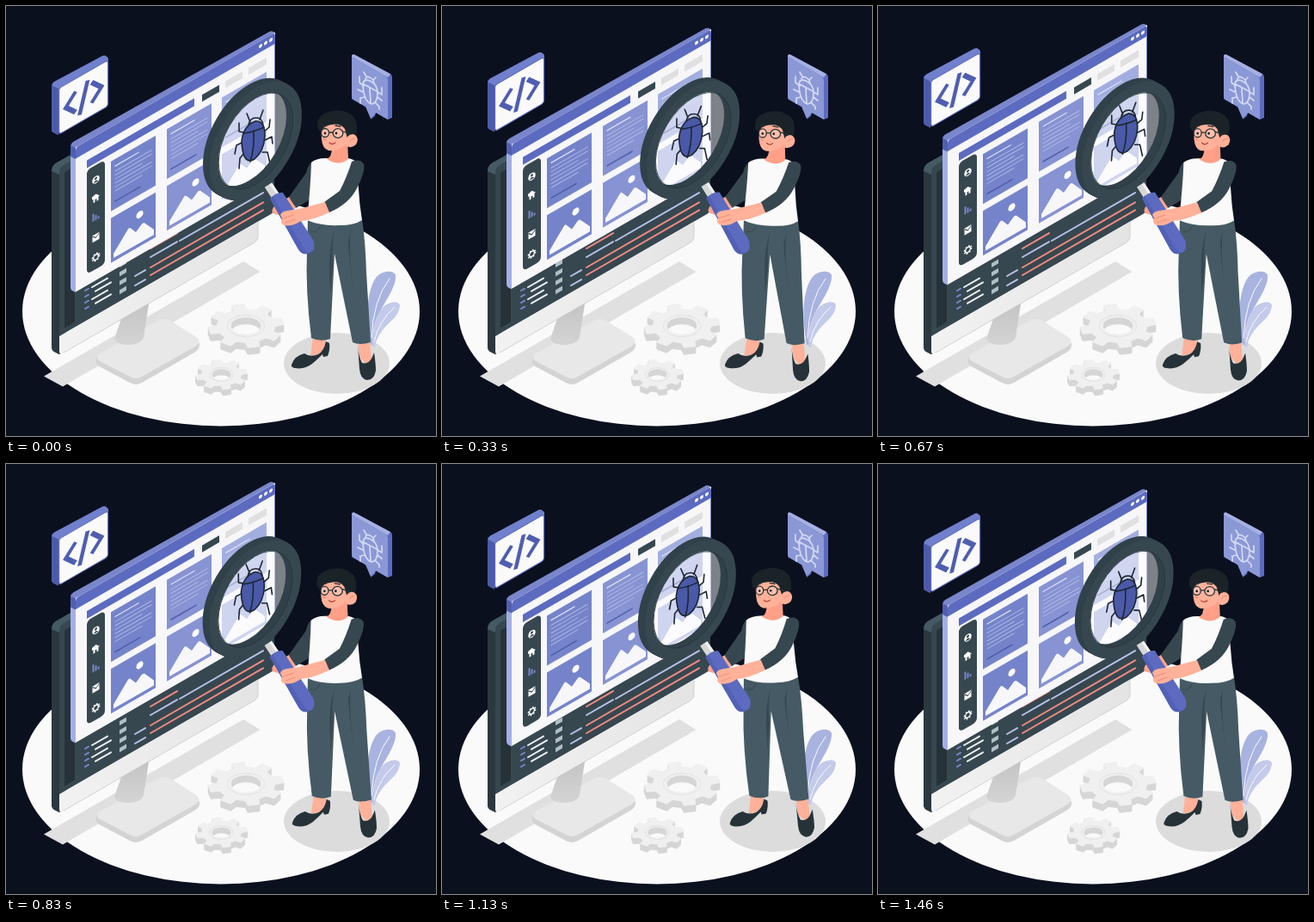
An HTML page that plays this animation: 500 by 500 pixels, repeating every 1.5 s.

```html
<!DOCTYPE html>
<html lang="en">
<head>
<meta charset="utf-8">
<title>Bug search</title>
<style>
  html, body { margin: 0; width: 100%; height: 100%; overflow: hidden; background: #0a101e; }
  svg { display: block; width: 100vw; height: 100vh; }
  .ln { fill: none; stroke-linecap: round; stroke-linejoin: round; }
</style>
</head>
<body>
<svg viewBox="0 0 500 500">
  <defs>
    <linearGradient id="neck" x2="0" y2="1"><stop stop-color="#c2c2c2"/><stop offset="1" stop-color="#d4d4d4"/></linearGradient>
    <linearGradient id="chin" x2="1"><stop stop-color="#f2f2f2"/><stop offset="1" stop-color="#e4e4e4"/></linearGradient>
  </defs>

  <!-- floor -->
  <ellipse cx="250" cy="355" rx="231" ry="133.4" fill="#fafafa"/>
  <path d="M44 430.500 276 297 295.500 309 66 442.500Z" fill="#e0e0e0"/>
  <ellipse cx="384.500" cy="415.500" rx="61.500" ry="35.500" fill="#dcdcdc"/>
  <g id="gears"></g>

  <!-- leaves -->
  <path d="M424 394C419 366 418 334 430 316 437 307 451 307 453 313 454 328 439 345 431 363 427 374 426 384 427 394Z" fill="#a9b3e0"/>
  <path d="M426 396C427 374 431 355 441 348 449 343 457 343 458 348 457 362 445 367 437 378 432 385 430 390 429 397Z" fill="#c3caea"/>
  <g class="ln" stroke="#fafafa"><path d="M425 386Q427 341 446 317M428 390Q434 365 452 350"/></g>

  <!-- stand -->
  <path d="M105 408V415Q106 418 110 420L144 438Q151 442 158 438L219 403Q226 399 225 392Z" fill="#d4d4d4"/>
  <path d="M109 404 176 366Q184 362 191 366L220 384Q229 390 220 396L158 431Q151 435 144 431L109 413Q102 408 109 404Z" fill="#e8e8e8"/>
  <path d="M136 358 167 340 160 385Q158 393 143 394 128 394 126 387Z" fill="url(#neck)"/>

  <!-- monitor -->
  <path d="M53 192Q53 185 59 182L75 173 85 180 68 402 62 405 56 402Q53 400 53 396Z" fill="#455a64"/>
  <path d="M53 192 62 196V405L56 402Q53 400 53 396Z" fill="#2b383f"/>
  <g transform="matrix(1 -.577 0 1 62 188)">
    <path d="M0 6Q0 0 5 0H250V190Q250 196 246 196H0Z" fill="#37474f"/>
    <path d="M6 9H232V190H6Z" fill="#263238"/>
    <path d="M18 20H250V190Q250 194 246 194H18Z" fill="#37474f"/>
    <path d="M0 196H231V213Q231 218 226 218H5Q0 218 0 213Z" fill="url(#chin)"/>
    <path d="M231 196V213Q231 218 226 218H5" fill="none" stroke="#c8c8c8" stroke-width=".7"/>
  </g>
  <g id="code" class="ln" stroke-width="2"></g>

  <!-- floating window -->
  <g class="float">
    <path d="M75 163Q75 160 78 158L306 30Q309 28 313 31L313 34 81 168Z" fill="#7986cb"/>
    <path d="M75 162 81 165V333L77 331Q75 330 75 327Z" fill="#a3aee6"/>
    <path d="M75 162 81 165V178L75 175Z" fill="#5060b0"/>
    <g transform="matrix(1 -.577 0 1 81 164.500)">
      <path d="M0 0H232V165Q232 168 229 168H0Z" fill="#f7f7fa"/>
      <path d="M0 4Q0 0 4 0H228Q232 0 232 4V13H0Z" fill="#5c6bc0"/>
      <path d="M231.500 13V164" stroke="#7986cb"/>
      <g fill="#fff"><circle cx="215" cy="6" r="2"/><circle cx="221" cy="6" r="2"/><circle cx="227" cy="6" r="2"/></g>
      <path d="M13 22.500H138V31.500H13Z" fill="#5c6bc0"/>
      <path d="M147 23.500H167V31.500H147Z" fill="#37474f"/>
      <path d="M174 23.500H194V31.500H174ZM201 23.500H222V31.500H201Z" fill="#e0e0e0"/>
      <rect x="13" y="34" width="21" height="121" rx="5" fill="#37474f"/>
      <g transform="translate(23.500 0)" fill="#fff">
        <circle cy="51" r="4.200"/>
        <path d="M-4.500 69 0 67.500 4.500 72H3V76.500H1V73.500H-1V76.500H-3V72H-4.500Z"/>
        <path d="M-4 89H-2V98H-4ZM-1 92H1V98H-1ZM2 95H4V98H2Z" fill="#7986cb"/>
        <path d="M-4 114H4V122H-4Z"/>
        <circle cy="141" r="3" fill="none" stroke="#fff" stroke-width="1.500"/>
        <circle cy="141" r="4.200" fill="none" stroke="#fff" stroke-width="1.400" stroke-dasharray="1.65"/>
        <g fill="#37474f"><circle cy="49.500" r="1.500"/><path d="M-2.700 54Q0 49.500 2.700 54Z"/></g>
        <path d="M-4 115 0 118.500 4 115" fill="none" stroke="#37474f"/>
      </g>
      <g id="cards"></g>
    </g>
  </g>

  <!-- code tag -->
  <g class="float">
    <path d="M53 93Q53 90 56 88L112 58Q116 56 119 61V65L61 98V150L55 147Q53 146 53 143Z" fill="#7180cd"/>
    <path d="M53 92 61 96V150L55 147Q53 146 53 143Z" fill="#4c5ba9"/>
    <g transform="matrix(1 -.577 0 1 61 95.500)">
      <rect x=".6" y=".6" width="57" height="53.500" rx="3" fill="#fafafa" stroke="#5c6bc0" stroke-width="1.200"/>
      <path class="ln" style="stroke-linecap:butt;stroke-linejoin:miter" d="M20 15.500 8.500 27.500 20 39.500M34 10.500 24.500 45.500M38.500 15.500 50 27.500 38.500 39.500" stroke="#4f5eb0" stroke-width="5"/>
    </g>
  </g>

  <!-- bug tag -->
  <path d="M402 59Q402 55 406 57L447 79Q449 80 449 83V130L444 132 402 108Z" fill="#5c6bc0"/>
  <path d="M402 59Q402 55 406 57L447 79 444 83Z" fill="#a7b0e2"/>
  <path d="M431 121 429 128 424 132 427 121Z" fill="#5c6bc0"/>
  <path d="M402 59 441 81Q444 83 444 86V132L430 124 424 131 418 117 404 109Q402 108 402 105Z" fill="#8b98d6"/>
  <g class="ln" stroke="#d5daf2" stroke-width="1.700">
    <path d="M415 92Q415 84 423 87 432 91 432 101 432 113 425 114 416 111 415 92ZM416 91 431 99M423 96 424 113M418 86Q418 81 423 83 428 85 428 91M419 82 416 77M427 86 430 83M416 93 411 89V82M415 100 409 97M417 106 412 107V113M432 100 437 103V95M432 106 437 110M429 112 434 117V120"/>
  </g>

  <!-- figure with magnifier -->
  <g id="figure">
    <path d="M358 179Q351 184 349 194L329 222 337 235 352 226 361 205Z" fill="#37474f"/>
    <path d="M329 222 337 235 324 245 310 241Q308 236 313 232Z" fill="#ffa58d"/>

    <!-- legs -->
    <path d="M357 384H371L372 395 366 404 354 407Z" fill="#ffb199"/>
    <path d="M409 389H423L425 412 419 417 411 408Z" fill="#ffb199"/>
    <path d="M332 417Q335 407 347 404 354 409 363 405 370 401 372 390L376 392Q377 400 374 407L369 408 368 405Q362 411 356 416 347 423 336 421 331 420 332 417Z" fill="#263238"/>
    <path d="M409 395Q410 408 414 415 421 417 425 410L428 403Q430 416 430 424 428 435 420 435 412 434 411 422Z" fill="#263238"/>
    <path d="M351 248H414Q418 274 419 310L424 391Q411 395 403 391L382 288 377 387Q366 391 355 386 348 330 350 284Z" fill="#455a64"/>
    <path d="M382 262Q378 279 380 300L377 335 376 300Q377 274 382 262ZM402 259Q397 276 404 330 398 287 398 273Z" fill="#37474f"/>
    <path class="ln" d="M355 262Q362 264 365 256" stroke="#37474f"/>

    <!-- torso -->
    <path d="M371 177Q361 177 355 182 354 213 350 249 366 256 388 255 405 255 414 249 411 231 410 213L407 181Q402 177 396 177Z" fill="#fafafa"/>
    <path d="M379 164 397 155 398 178Q387 187 373 178 379 176 379 164Z" fill="#ff9f87"/>

    <!-- magnifier -->
    <g id="lens"></g>
    <path d="M305 208 314 222" stroke="#d7d7d7" stroke-width="10"/>
    <path d="M308 207 317 220" stroke="#f3f3f3" stroke-width="3"/>
    <path d="M307 224Q314 216 322 217L357 272Q361 284 353 287 345 291 340 283Z" fill="#5c6bc0"/>
    <path d="M307 224 310 221 345 280Q348 286 353 287 345 291 340 283Z" fill="#5261b5"/>

    <!-- near arm -->
    <path d="M402 181Q412 177 416 184 418 192 408 212 399 230 376 240 371 236 370 228L388 215Q396 200 402 181Z" fill="#37474f"/>
    <path d="M371 228 376 240Q357 249 343 250 333 257 323 255 318 252 321 247L319 243Q320 239 327 238L341 236Z" fill="#ffb199"/>
    <path class="ln" d="M322 247 334 243M325 252 336 248" stroke="#ef8e78"/>

    <!-- head -->
    <path d="M369 134Q366 146 367 155 368 166 375 168 384 169 392 164L400 155 405 145 394 130Z" fill="#ffb199"/>
    <path d="M362 140Q361 127 376 123 390 119 401 126 409 131 408 145L404 157 397 154 394 143Q389 136 378 138 369 139 367 146 363 145 362 140Z" fill="#1a2328"/>
    <path d="M396 154Q400 147 406 150 411 154 407 161 402 166 396 163Z" fill="#ffb199"/>
    <path class="ln" d="M400 157Q403 153 406 154M372 151 369 155 372 156" stroke="#ef8e78"/>
    <g class="ln" stroke="#263238" stroke-width="1.300">
      <ellipse cx="371" cy="147.500" rx="4.500" ry="5" fill="#fff" fill-opacity=".2"/>
      <ellipse cx="386" cy="148" rx="5.800" ry="5.300" fill="#fff" fill-opacity=".2"/>
      <path d="M376 147H380M392 146 401 149M369 140 373 139M383 139 389 140"/>
    </g>
    <g fill="#1b242a"><circle cx="371" cy="148" r="1.400"/><circle cx="384" cy="148" r="1.400"/></g>
    <path class="ln" d="M376 159Q379 162 383 159" stroke="#b6473e" stroke-width="1.300"/>
  </g>
</svg>

<script>
const LOOP = 1500, STEPS = 36;
const $ = id => document.getElementById(id);
const fill = (id, html) => { $(id).innerHTML = html; };
const times = (n, f) => Array.from({ length: n }, (_, i) => f(i)).join('');
const line = (d, color, w) => `<path class="ln" d="${d}" stroke="${color}" stroke-width="${w}"/>`;

// line along the screen's slope, starting at x, y
const slant = (x, y, w, color) => line(`M${x} ${y}l${w} ${-.577 * w}`, color, 2);

const textCard = (x, color) => `<g transform="translate(${x} 40)">
  <path d="M0 0H52V58H0Z" fill="${color}"/>
  ${line('M5 8H32', '#dfe3f5', 1.4)}
  ${times(6, i => line(`M5 ${14 + 4.6 * i}H${i % 3 === 2 ? 36 : 47}`, '#b7c0e8', .9))}
  ${line('M5 49H34', '#4c5ba9', 1.6)}</g>`;

const imageCard = (x, color) => `<g transform="translate(${x} 106)">
  <path d="M0 0H52V52H0Z" fill="${color}"/>
  <circle cx="33.500" cy="15" r="4" fill="#fff"/>
  <path d="M3 48V43L19 25Q21 22 23 25L29 33 35 28Q37 26 39 28L50 42V48Z" fill="#f7f7fa"/></g>`;

fill('cards', [[41, '#7584ca'], [106, '#8793d2'], [170, '#a3aee0']]
  .map(([x, c]) => textCard(x, c) + imageCard(x, c)).join(''));

const lilac = '#b9c1ea', red = '#f28b82';
fill('code',
  times(4, i => slant(92, 331 + 7 * i, 4, '#7986cb') + slant(100 + i % 2 * 4, 327 + 7 * i - i % 2 * 2.3, 18, '#eceff1')) +
  times(4, i => `<path d="M132 ${299 + 10.4 * i}l8-4.600v5l-8 4.600z" fill="#b0bec5"/>`) +
  slant(150, 314, 12, lilac) + slant(150, 325, 12, lilac) +
  slant(168, 282, 31, red) + slant(168, 292, 31, lilac) + slant(202, 273, 97, lilac) +
  slant(168, 304, 131, red) + slant(168, 313, 131, red));

function gear(cx, cy, r, hole, depth) {
  const pts = [], pitch = Math.PI / 4;
  for (let k = 0; k < 8; k++) {
    for (const [a, q] of [[-.3, .77], [-.2, 1], [.2, 1], [.3, .77]]) {
      const t = (k + .73 + a) * pitch;
      pts.push([cx + r * q * Math.cos(t), cy + .577 * r * q * Math.sin(t)].map(v => v.toFixed(1)));
    }
  }
  const h = hole * .577;
  const d = `M${pts.join('L')}ZM${cx - hole} ${cy}a${hole} ${h} 0 1 0 ${2 * hole} 0a${hole} ${h} 0 1 0 ${-2 * hole} 0Z`;
  const layer = (y, color) => `<path transform="translate(0 ${y})" fill-rule="evenodd" stroke-linejoin="round" d="${d}" fill="${color}" stroke="${color}"/>`;
  return times(depth, i => layer(depth - i, '#d6d6d6')) + layer(0, '#f0f0f0') +
    `<ellipse cx="${cx}" cy="${cy}" rx="${hole * 1.2}" ry="${h * 1.2}" fill="none" stroke="#e2e2e2"/>`;
}
fill('gears', gear(279, 372, 44, 18, 8) + gear(250.5, 428.5, 30, 11.5, 7));

// upright discs facing left, swept back for the rim
const disc = (r, dx, color, more = '') =>
  `<circle r="${r}" transform="matrix(.866 -.5 0 1 ${290.5 + dx} ${157 + dx / 2})" fill="${color}" ${more}/>`;
const ring = (dx, color) => disc(56, dx, 'none', `stroke="${color}" stroke-width="11.500"`);

fill('lens', `
  ${disc(52, -6, '#fff', 'opacity=".47"')}
  <g id="bug" class="ln" stroke="#1c2733" stroke-width="1.600">
    <path d="M277 147 271 146 271 136M274 159 268 162 266 172M277 171 272 177 271 189M300 146 306 141 307 132M301 156 309 152 310 160M298 170 304 170 307 183M284 135 280 125M295 132 299 121M282 139Q283 130 291 130 298 130 299 139"/>
    <path d="M274 157Q276 139 290 134 301 133 301 151 300 169 289 178 275 186 274 157Z" fill="#4a59a8"/>
    <path d="M276 148Q287 147 300 141M288 145Q289 166 284 181"/>
  </g>
  ${times(8, i => ring(i - 8, '#31414a'))}
  ${ring(0, '#37474f')}
  ${disc(50, 0, 'none', 'stroke="#27343b" stroke-width=".8"')}`);

const floats = document.querySelectorAll('.float');

function draw(now) {
  const step = Math.floor(now % LOOP / LOOP * STEPS + .1);
  const a = 2 * Math.PI * step / STEPS;
  const lift = `translate(0 ${-4.4 * (1 - Math.cos(a))})`;
  floats.forEach(g => g.setAttribute('transform', lift));
  $('bug').setAttribute('transform', lift);
  $('figure').setAttribute('transform', `rotate(${Math.sin(a)} 345 250)`);
}

const start = performance.now();
function tick() {
  draw(performance.now() - start);
  requestAnimationFrame(tick);
}
tick();
</script>
</body>
</html>
```
